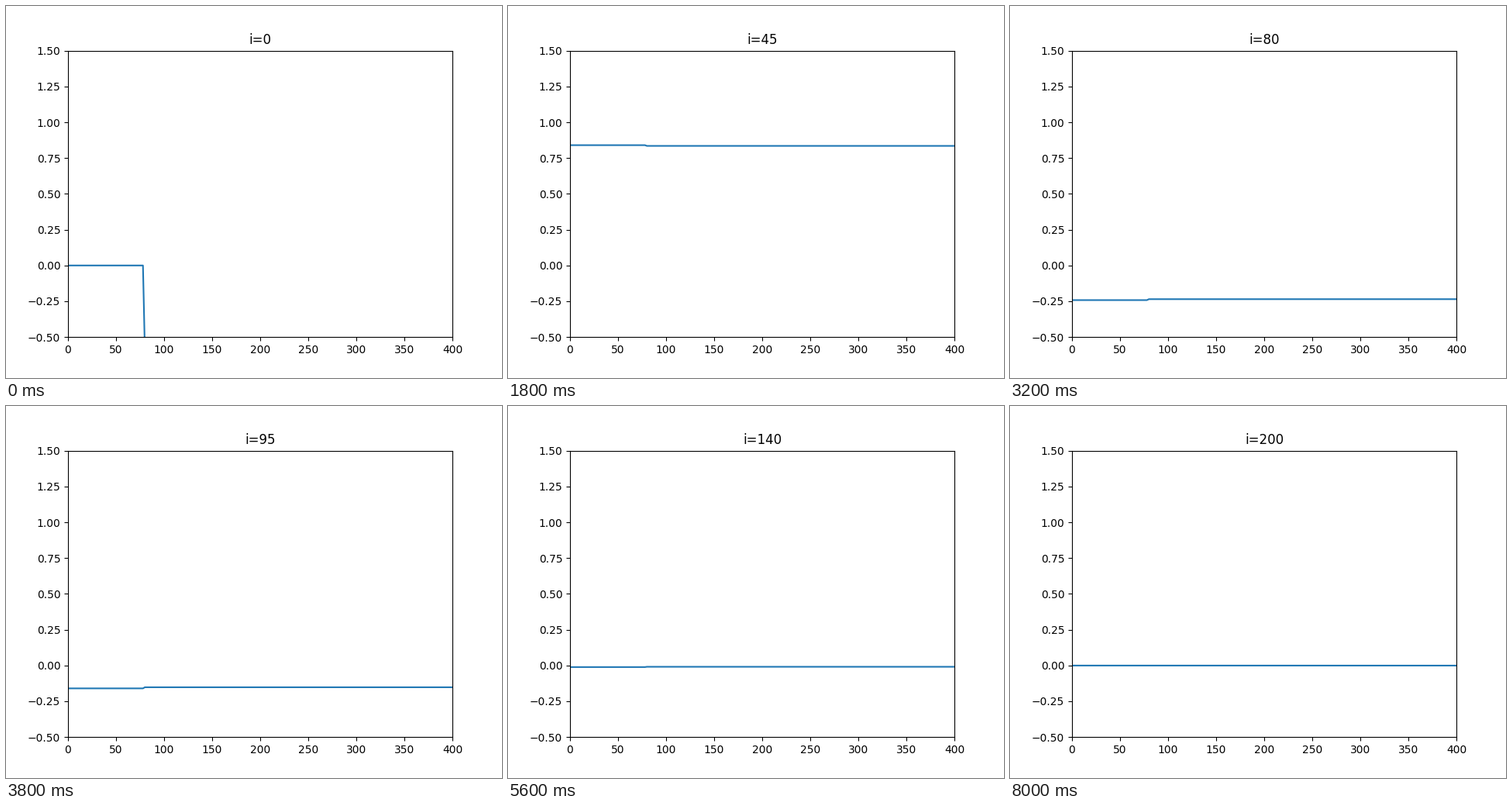
A matplotlib script for the animation above (8.2 s loop, 640 by 480 pixels).

```python
import numpy as np
import matplotlib.pyplot as plt
from matplotlib.animation import FuncAnimation

STEP = 5           # time steps per drawn frame
FRAMES = 41
INTERVAL = 200     # ms
EDGE = 80          # position where the two halves of the medium meet

# Plateau, fall, undershoot and recovery of an excitation pulse: (time, level)
KEYS = [(0, 1.22), (30, .99), (45, .84), (60, .595), (65, .356), (70, .06),
        (75, -.18), (85, -.218), (95, -.16), (120, -.055), (150, 0),
        (165, .006), (200, -.0005)]
T, V = np.array(KEYS, float).T
SLOPE = np.gradient(V, T)


def curve(t):
    """Smooth cubic Hermite path through the key points."""
    k = min(np.searchsorted(T, t, side="right") - 1, len(T) - 2)
    h = T[k + 1] - T[k]
    s = (t - T[k]) / h
    return ((1 + 2 * s) * (1 - s) ** 2 * V[k]
            + s * (1 - s) ** 2 * h * SLOPE[k]
            + s * s * (3 - 2 * s) * V[k + 1]
            + s * s * (s - 1) * h * SLOPE[k + 1])


def level(t, start, lead=0):
    """Fast upstroke from the start level onto the pulse curve."""
    return curve(t + lead) + (start - curve(0)) * np.exp(-t / 1.7)


def lead_at(t):
    """How far the right half runs ahead once the pulse starts to fall."""
    return 1.5 / (1 + np.exp((50 - t) / 5))


x = np.arange(0, 402, 2)

fig, ax = plt.subplots(figsize=(6.4, 4.8), dpi=100)
ax.set_xlim(0, 400)
ax.set_ylim(-0.5, 1.5)
line, = ax.plot(x, np.zeros(len(x)), color="C0", lw=1.5)
title = ax.set_title("i=0")


def update(frame):
    i = frame * STEP
    left = level(i, start=0)
    right = level(i, start=-0.6, lead=lead_at(i))
    line.set_ydata(np.where(x < EDGE, left, right))
    title.set_text(f"i={i}")
    return line, title


anim = FuncAnimation(fig, update, frames=FRAMES, interval=INTERVAL,
                     repeat=True, repeat_delay=0)
plt.show()
```
